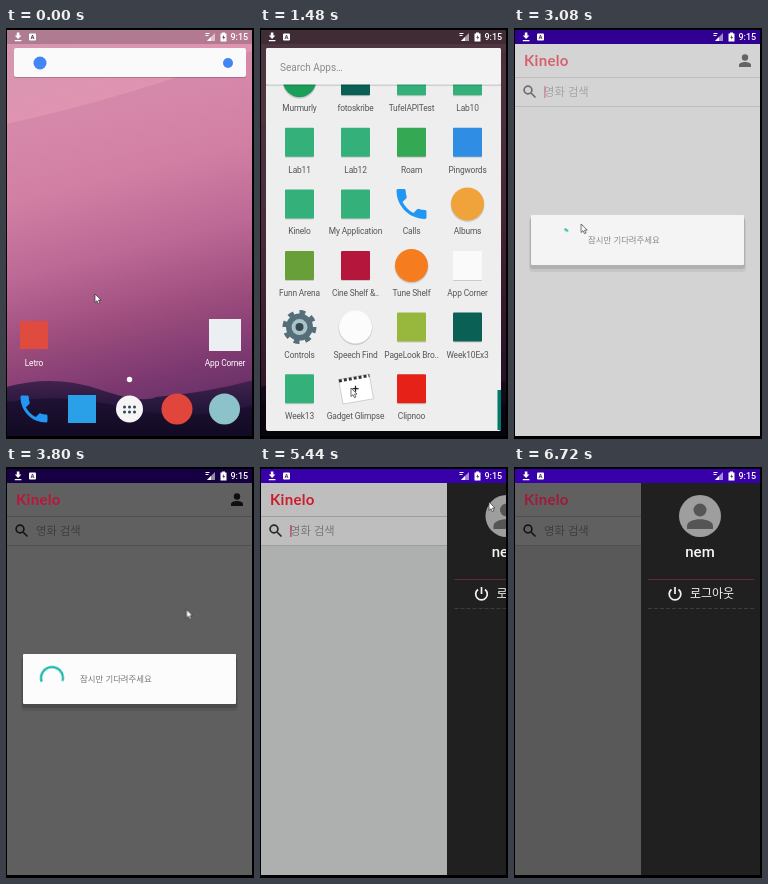
Recreate the animation shown at these times as an HTML page. Size 248 by 411 pixels, loop 6.92 s.

```html
<!DOCTYPE html>
<html lang="ko">
<head>
<meta charset="utf-8">
<title>App launch walkthrough</title>
<style>
html, body { margin: 0; width: 100%; height: 100%; overflow: hidden; background: #000; }
#stage { position: relative; width: 248px; height: 411px; overflow: hidden; background: #000; }
#screen { position: absolute; inset: 0; clip-path: inset(2px 2px 3px 1px); }
.layer { position: absolute; inset: 0; }
.layer > svg { position: absolute; left: 0; top: 0; display: block; }
text { font-family: Roboto, "Noto Sans", sans-serif; }
.ko { font-family: "Noto Sans CJK KR", "Noto Sans CJK", sans-serif; }
.label { font-size: 8.4px; letter-spacing: -.15px; text-anchor: middle; }

/* Every part runs on one shared loop */
.anim { animation: 6.92s linear infinite; }

#homeIcons { animation-name: homeIcons; }
@keyframes homeIcons { 0%, 15.03% { opacity: 1 } 17.9%, 100% { opacity: 0 } }

#shade { animation-name: shade; }
@keyframes shade { 0%, 15.03% { opacity: 0 } 19.08%, 100% { opacity: 1 } }

#drawer { animation-name: reveal; }
@keyframes reveal {
  0%, 15.03% { clip-path: circle(0 at 123px 381px); animation-timing-function: ease-in-out }
  19.08%, 100% { clip-path: circle(420px at 123px 381px) }
}
#apps { animation-name: scroll; }
@keyframes scroll {
  0%, 18.8% { transform: translateY(217px); animation-timing-function: cubic-bezier(.4, 0, .3, 1) }
  21.3%, 100% { transform: translateY(0) }
}
#thumb { animation-name: thumb; }
@keyframes thumb {
  0%, 18.8% { transform: translateY(-300px); opacity: 1; animation-timing-function: cubic-bezier(.4, 0, .3, 1) }
  21.3%, 24.86% { transform: translateY(0); opacity: 1 }
  26.01%, 100% { transform: translateY(0); opacity: 0 }
}

#app { animation-name: launch; }
@keyframes launch {
  0%, 36.41% { clip-path: inset(160px 194px 221px 24px); opacity: 0 }
  36.42% { clip-path: inset(160px 194px 221px 24px); opacity: .3 }
  38.15% { clip-path: inset(160px 2px 0 2px); opacity: .9 }
  39.31%, 100% { clip-path: inset(0); opacity: 1 }
}
.content { animation-name: content; }
@keyframes content { 0%, 43.06% { opacity: 0 } 45.38%, 100% { opacity: 1 } }

#list { animation-name: list; }
@keyframes list { 0%, 59.54% { fill: #eee } 61.27%, 100% { fill: #dddfde } }

#title { animation-name: title; }
@keyframes title {
  0%, 43.79% { fill: #e0202e }
  46.97%, 59.54% { fill: #b8173a }
  62.72%, 77.7% { fill: #e0202e }
  78.61% { fill: #cc1c2c }
  84.93%, 100% { fill: #a01a3a }
}
#caret { animation-name: caret; animation-timing-function: step-end; }
@keyframes caret {
  0%, 60.69%, 75.15%, 89.6% { opacity: 1 }
  50.29%, 67.92%, 82.37%, 97.11% { opacity: 0 }
}

#dim { animation-name: dim; }
@keyframes dim { 0%, 43.79% { opacity: 0 } 46.97%, 59.54% { opacity: .6 } 62.72%, 100% { opacity: 0 } }

#dialog { animation-name: dialog; }
@keyframes dialog { 0%, 43.35% { opacity: 0 } 44.8%, 59.54% { opacity: 1 } 61.27%, 100% { opacity: 0 } }

#spinner { transform-origin: 46px 211px; animation-name: spin; }
@keyframes spin {
  0%, 43.93% { transform: rotate(282deg); stroke-dasharray: 8 352 }
  44.51% { transform: rotate(294deg); stroke-dasharray: 22 338; animation-timing-function: cubic-bezier(.4, .1, .6, .9) }
  54.91% { transform: rotate(520deg); stroke-dasharray: 215 145 }
  56.36% { transform: rotate(551deg); stroke-dasharray: 250 110 }
  60.69%, 100% { transform: rotate(835deg); stroke-dasharray: 60 300 }
}

#scrim { animation-name: scrim; }
@keyframes scrim { 0%, 77.7% { opacity: 0 } 78.61% { opacity: .21 } 84.93%, 100% { opacity: .6 } }

#side { animation-name: side; }
@keyframes side {
  0%, 77.7% { transform: translateX(119px); animation-timing-function: cubic-bezier(.22, 1, .36, 1) }
  84.93%, 100% { transform: translateX(0) }
}

#cursor { animation-name: cursor; }
@keyframes cursor {
  0%, 3.47% { transform: translate(89px, 266px); animation-timing-function: ease-in-out }
  7.51% { transform: translate(168px, 386px); animation-timing-function: ease-in-out }
  9.25%, 16.19% { transform: translate(124px, 383px); animation-timing-function: ease-in-out }
  19.65%, 28.32% { transform: translate(91px, 360px); animation-timing-function: ease-in-out }
  35.84%, 37.57% { transform: translate(42px, 180px) }
  44.51% { transform: translate(67px, 196px) }
  48.56% { transform: translate(110px, 178px) }
  52.6%, 64.16% { transform: translate(180.5px, 142.5px); animation-timing-function: ease-in }
  69.36% { transform: translate(220px, 43px); animation-timing-function: ease-out }
  72.25%, 79.19% { transform: translate(229px, 35px) }
  82.66%, 100% { transform: translate(250px, 6px) }
}
</style>
</head>
<body>
<div id="stage">
<div id="screen">

  <div class="layer" id="home">
    <svg width="248" height="411">
      <defs>
        <linearGradient id="sky" x1=".4" y1="0" x2=".55" y2="1">
          <stop offset="0" stop-color="#d596b0"/>
          <stop offset=".2" stop-color="#e193b0"/>
          <stop offset=".36" stop-color="#dc89a9"/>
          <stop offset=".54" stop-color="#c4709a"/>
          <stop offset=".7" stop-color="#a3527f"/>
          <stop offset=".86" stop-color="#7c3a70"/>
          <stop offset="1" stop-color="#5a2b60"/>
        </linearGradient>
        <linearGradient id="hill" x1="0" y1="0" x2="0" y2="1">
          <stop offset="0" stop-color="#43234f"/>
          <stop offset=".5" stop-color="#23153a"/>
          <stop offset="1" stop-color="#0c0818"/>
        </linearGradient>
        <symbol id="handset" viewBox="0 0 24 24">
          <path d="M6.6 10.8c1.4 2.8 3.8 5.1 6.6 6.6l2.2-2.2c.3-.3.7-.4 1-.2 1.100.4 2.300.6 3.600.6.6 0 1 .4 1 1V20c0 .6-.4 1-1 1C10.600 21 3 13.400 3 4c0-.6.4-1 1-1h3.500c.6 0 1 .4 1 1 0 1.200.2 2.400.6 3.600.1.3 0 .7-.2 1z"/>
        </symbol>
      </defs>
      <rect width="248" height="411" fill="url(#sky)"/>
      <g fill="#7c2f78" opacity=".1">
        <path d="M0 96Q120 70 248 22V411H0Z"/>
        <path d="M0 212Q130 196 248 142V411H0Z"/>
        <path d="M0 286Q130 274 248 232V411H0Z"/>
      </g>
      <path d="M0 359Q48 346 92 361T150 369Q200 365 248 352V411H0Z" fill="url(#hill)"/>
      <path d="M0 374Q60 364 120 380T248 377V411H0Z" fill="#140c28" opacity=".6"/>
      <rect width="248" height="16" fill="#000" opacity=".18"/>
      <g id="homeIcons" class="anim">
        <rect x="8" y="21" width="232" height="29" rx="2" fill="#000" opacity=".2"/>
        <rect x="8" y="20" width="232" height="29" rx="2" fill="#fafafa"/>
        <circle cx="34" cy="35" r="6.500" fill="#4285f4"/>
        <circle cx="222" cy="35" r="5" fill="#4285f4"/>
        <rect x="14" y="293" width="28" height="28" fill="#e04b3f"/>
        <rect x="203" y="291" width="32" height="32" fill="#eceff1"/>
        <g class="label" fill="#fff">
          <text x="28" y="338">Letro</text>
          <text x="219" y="338">App Corner</text>
        </g>
        <circle cx="123.500" cy="351.500" r="2.700" fill="#fff"/>
        <use href="#handset" x="10" y="363" width="36" height="36" fill="#2196f3"/>
        <rect x="62" y="367" width="28" height="28" fill="#29a0e8"/>
        <circle cx="123.500" cy="381" r="13.500" fill="#f5f5f5"/>
        <path d="M118.500 379h.01m4.990 0h.01m4.990 0h.01m-10.010 5h.01m4.990 0h.01m4.990 0h.01" stroke="#37474f" stroke-width="3" stroke-linecap="round"/>
        <circle cx="171" cy="381" r="15.500" fill="#e0463b"/>
        <circle cx="218.500" cy="381" r="15.500" fill="#8cc3ca"/>
      </g>
      <rect id="shade" class="anim" width="248" height="411" fill="#000" fill-opacity=".64"/>
    </svg>
  </div>

  <div class="layer anim" id="drawer">
    <svg width="248" height="411">
      <rect x="6" y="20" width="235" height="383" rx="2" fill="#eee"/>
      <svg x="6" y="56" width="235" height="347" viewBox="6 56 235 347">
        <g id="apps" class="anim"></g>
        <rect id="thumb" class="anim" x="237.500" y="362" width="3.500" height="40" fill="#00796b"/>
      </svg>
      <rect x="6" y="56" width="235" height="2" fill="#000" opacity=".13"/>
      <rect x="6" y="20" width="235" height="36.500" rx="2" fill="#f3f3f3"/>
      <text x="20" y="42.500" font-size="10" fill="#8b8b8b">Search Apps…</text>
    </svg>
  </div>

  <div class="layer anim" id="app">
    <svg width="248" height="411">
      <rect width="248" height="411" fill="#fff"/>
      <rect width="248" height="16" fill="#3700a8"/>
      <g class="anim content">
        <rect y="16" width="248" height="63" fill="#f1f1f1"/>
        <rect id="list" class="anim" y="79" width="248" height="332"/>
        <path d="M0 49.500H248M0 78.500H248" stroke="#c6c6c6"/>
        <g fill="#222">
          <circle cx="231" cy="29.500" r="3.200"/>
          <path d="M225 39v-2c0-4 12-4 12 0v2z"/>
        </g>
        <g fill="none" stroke="#333" stroke-width="1.700">
          <circle cx="14" cy="62" r="3.900"/>
          <path d="M17 65l4.500 4.500"/>
        </g>
        <text class="ko" x="30" y="67.500" font-size="11.300" fill="#999">영화 검색</text>
        <rect id="caret" class="anim" x="30.300" y="58" width="1.200" height="12" fill="#e8476f"/>
      </g>
      <rect id="dim" class="anim" width="248" height="411"/>
      <g id="dialog" class="anim">
        <g fill="#000">
          <rect x="15" y="190" width="217" height="54" rx="4" opacity=".08"/>
          <rect x="16" y="189" width="215" height="52" rx="3" opacity=".14"/>
        </g>
        <rect x="17" y="187" width="213" height="50" rx="1" fill="#fbfcfb"/>
        <circle id="spinner" class="anim" cx="46" cy="211" r="11" pathLength="360" fill="none" stroke="#14b8a8" stroke-width="2.200"/>
        <text class="ko" x="74" y="215" font-size="8.400" fill="#777">잠시만 기다려주세요</text>
      </g>
      <rect id="scrim" class="anim" y="16" width="248" height="395"/>
      <g class="anim content">
        <text id="title" class="anim" x="10" y="38" style="font: 700 15px Lato, sans-serif; letter-spacing: .3px">Kinelo</text>
      </g>
      <g id="side" class="anim">
        <rect x="127" y="16" width="121" height="395" fill="#202020"/>
        <circle cx="186" cy="49" r="21" fill="#9e9e9e"/>
        <g fill="#555">
          <circle cx="186" cy="43" r="6.500"/>
          <path d="M173 62v-3c0-9 26-9 26 0v3z"/>
        </g>
        <text x="186" y="90" font-size="15" font-weight="500" text-anchor="middle" fill="#f4f4f4">nem</text>
        <path d="M134 112.500H240" stroke="#642a32"/>
        <path d="M134 141.500H240" stroke="#3c3c3c" stroke-dasharray="4 2"/>
        <path d="M157.500 122.500a5.800 5.800 0 1 0 7 0M161 120v7" fill="none" stroke="#f4f4f4" stroke-width="1.700"/>
        <text class="ko" x="176" y="131" font-size="12" font-weight="500" fill="#f4f4f4">로그아웃</text>
      </g>
    </svg>
  </div>

  <div class="layer" id="status">
    <svg width="248" height="411" fill="#fff">
      <path d="M10.800 4.500h2.600v3h2l-3.300 3.500-3.300-3.500h2zM8.800 12h6.600v1.300H8.800z"/>
      <rect x="23" y="5.500" width="7" height="7" rx="1"/>
      <path d="M25 11l1.500-4 1.500 4M25.500 9.800h2" fill="none" stroke="#3a2a50" stroke-width=".8"/>
      <path d="M209 5v8h-8z" opacity=".55"/>
      <path d="M205 9v4h-4zM199.500 5h4v1h-4zM199.500 7h3v1h-3z"/>
      <path d="M216 4.500h3v1h1.500v8h-6v-8h1.500z"/>
      <path d="M217.800 7l-1.500 2.700h1.200v2l1.500-2.800h-1.200z" fill="#3a2a50"/>
      <text x="224.500" y="12.300" font-size="9" font-weight="500">9:15</text>
    </svg>
  </div>
</div>

<div class="layer">
  <svg width="248" height="411">
    <path id="cursor" class="anim" d="M0 0v8.500l2-1.800 1.400 3 1.500-.7-1.400-2.900h2.500z" fill="#fff" stroke="#333" stroke-width=".7"/>
  </svg>
</div>
</div>

<script>
const green = '#34b07b', teal = '#0b6055';
// Each cell: label | colour | shape (square unless given)
const rows = [
  ['Calculator|#4a6fa5', 'Calendar|#4285f4', 'Camera|#8cc3ca|circle', 'Clock|#3f51b5|circle'],
  ['Contacts|#1e88e5|circle', 'Dev Tools|#78909c', 'Downloads|#3f6fd8|circle', `Lab7|${green}`],
  ['Files|#5c6bc0', `Lab8|${green}`, 'Letro|#e04b3f', `Lab9|${green}`],
  ['Murmurly|#1b9e59|circle', `fotoskribe|${teal}`, `TufelAPITest|${green}`, `Lab10|${green}`],
  [`Lab11|${green}`, `Lab12|${green}`, 'Roam|#34a853', 'Pingwords|#2f8de4'],
  [`Kinelo|${green}`, `My Application|${green}`, 'Calls|#2196f3|handset', 'Albums|#f0a33a|circle'],
  ['Funn Arena|#689f38', 'Cine Shelf &..|#b5173c', 'Tune Shelf|#f57c1f|circle', 'App Corner|#fafafa'],
  ['Controls|#546e7a|gear', 'Speech Find|#fcfcfc|circle', 'PageLook Bro..|#97b83d', `Week10Ex3|${teal}`],
  [`Week13|${green}`, 'Gadget Glimpse|#fff|card', 'Clipnoo|#e62117']
];
const shapes = {
  square: c => `<rect x="-14.500" y="-13.500" width="29" height="29" rx="1" fill="#000" opacity=".15"/>
    <rect x="-14.500" y="-14.500" width="29" height="29" rx="1" fill="${c}"/>`,
  circle: c => `<circle cy="1" r="17" fill="#000" opacity=".15"/><circle r="16.500" fill="${c}"/>`,
  handset: c => `<use href="#handset" x="-20" y="-20" width="40" height="40" fill="${c}"/>`,
  gear: c => `<circle r="13.500" fill="${c}"/>
    <circle r="14.500" fill="none" stroke="${c}" stroke-width="5" pathLength="16" stroke-dasharray="1"/>
    <circle r="8" fill="#a9c3c9"/><circle r="4" fill="#37474f"/>`,
  card: c => `<g transform="rotate(-10)"><rect x="-15" y="-12" width="31" height="25" fill="${c}" stroke="#bbb" stroke-width=".6"/>
    <path d="M-15-10.500H16" stroke="#333" stroke-width="3" stroke-dasharray="3 2"/></g>
    <path d="M-3 0h6M0-3v6" stroke="#222" stroke-width="1.300"/>`
};
const columns = [39.5, 95.5, 151.5, 207.5];

document.getElementById('apps').innerHTML = rows.map((row, r) => row.map((cell, c) => {
  const [label, colour, shape = 'square'] = cell.split('|');
  const y = 52.7 + (r - 3) * 61.6;
  return `<g transform="translate(${columns[c]} ${y})">${shapes[shape](colour)}
    <text class="label" y="30.500" fill="#555">${label.replace('&', '&amp;')}</text></g>`;
}).join('')).join('');
</script>
</body>
</html>
```
